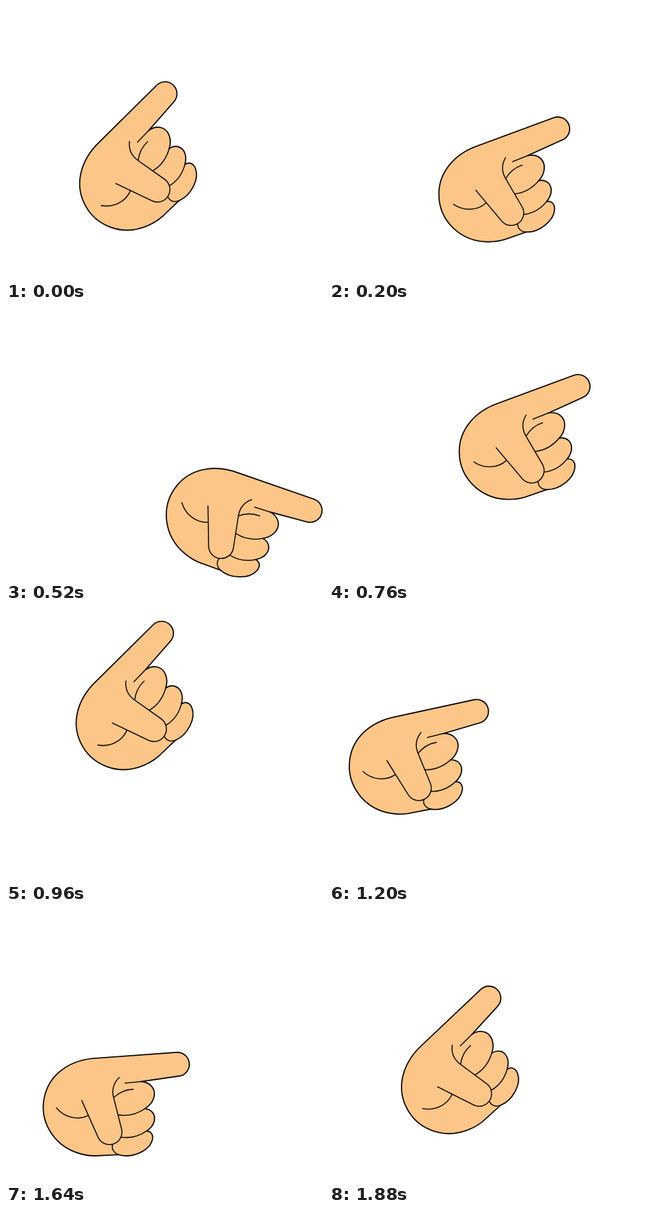
An HTML page with a canvas that plays this animation: 498x428 px, repeating every 1920 ms.

```html
<!DOCTYPE html>
<html lang="en">
<head>
<meta charset="utf-8">
<title>Pointing hand</title>
<style>
html, body { margin: 0; width: 100%; height: 100%; overflow: hidden; background: #fff; }
canvas { display: block; }
</style>
</head>
<body>
<canvas id="stage" width="498" height="428"></canvas>
<script>
(() => {
  const ctx = document.getElementById('stage').getContext('2d');
  const LOOP = 1920, LEG = 480, STEP = 40;

  // Palm centre at each turning point, with the curve handles between them.
  const low = [191.3, 276.3], right = [328.2, 330.5];
  const high = [185.8, 178.3], left = [86.3, 330.5];
  const legs = [
    [low, [50, 10], [-31, -12], right],
    [right, [-12, -45], [120, 27], high],
    [high, [-100, 27], [25, -45], left],
    [left, [52, -14], [-30, 14], low]
  ];

  // The paths show the hand with its palm centre at PIVOT.
  const PIVOT = [250, 294];
  const outline = new Path2D(
    'M236 218 L354.8 174.6 A18.7 18.7 0 0 1 368.2 209.5 L314 233.8 ' +
    'C328 231 340 239 339.8 253 C339.5 261 336 268 331 273.2 ' +
    'C342 271 350.5 278 350.5 288.5 C350.5 295 347.5 301 343.2 306 ' +
    'C351 304.5 356 310 355.7 318 C355 336 332 354.5 311 353.8 ' +
    'L277 365.5 C270 367.7 262 369 252 369 ' +
    'C208 369 174 336 174 294 C174 260 198 231 236 218 Z'
  );
  const creases = new Path2D(
    'M314 233.8 L290 243.3 ' +
    'M279 270 C285 260 294 252.5 305 249 ' +
    'M331 273.2 C321 285 308 292.5 293 294 ' +
    'M343.2 306 C334 317.5 322 324.5 307.5 326.3 ' +
    'M311 353.8 C303 353.3 298 348.5 297.8 341.8 ' +
    'M197 310 C212 320.5 234 321 248 308 ' +
    'M232 288 L272.7 336.5 A19.6 19.6 0 0 0 304.6 314 ' +
    'L279 270 C272.5 259 273 247 279 237'
  );

  const smooth = p => p * p * (3 - 2 * p);

  function along([a, ha, hb, b], u) {
    const v = 1 - u;
    return [0, 1].map(i =>
      v * v * v * a[i] + 3 * v * v * u * (a[i] + ha[i]) +
      3 * v * u * u * (b[i] + hb[i]) + u * u * u * b[i]);
  }

  function draw(t) {
    const n = Math.floor(t / LEG);
    const u = smooth((t % LEG) / LEG);
    const swing = n % 2 ? 1 - u : u;
    const [x, y] = along(legs[n], u);

    ctx.setTransform(1, 0, 0, 1, 0, 0);
    ctx.fillStyle = '#fff';
    ctx.fillRect(0, 0, 498, 428);
    ctx.translate(x, y);
    ctx.rotate((-24.6 + 65 * swing) * Math.PI / 180);
    ctx.translate(-PIVOT[0], -PIVOT[1]);
    ctx.fillStyle = '#fcc688';
    ctx.fill(outline);
    ctx.strokeStyle = '#0c0804';
    ctx.lineCap = ctx.lineJoin = 'round';
    ctx.lineWidth = 1.9;
    ctx.stroke(outline);
    ctx.lineWidth = 1.6;
    ctx.stroke(creases);
  }

  const start = performance.now();
  function tick() {
    const step = Math.floor((performance.now() - start + 1) / STEP);
    draw(step * STEP % LOOP);
    requestAnimationFrame(tick);
  }
  tick();
})();
</script>
</body>
</html>
```
